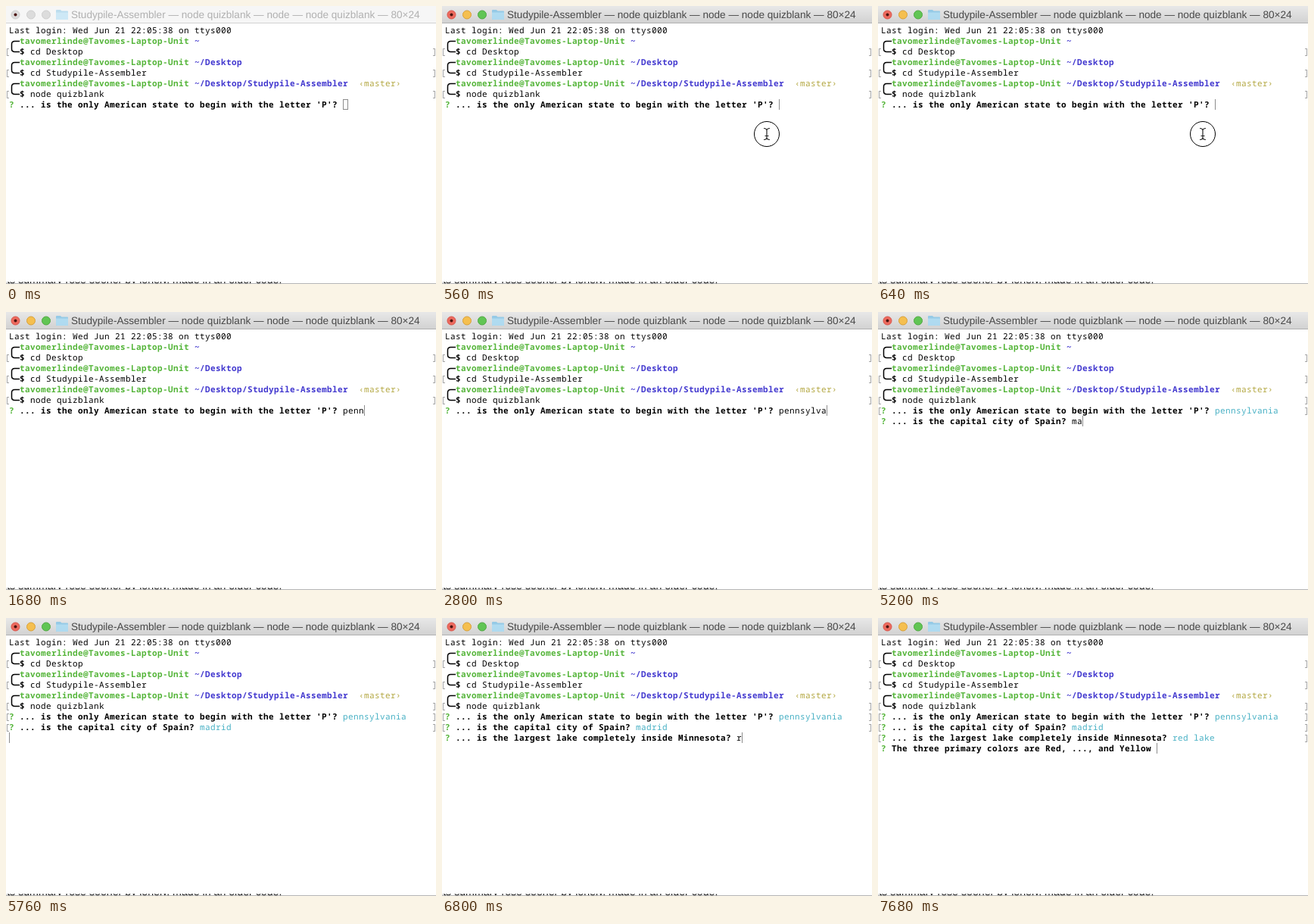
Write an HTML page that moves like this. It is 568x367 px and loops after 8000 ms.

```html
<!DOCTYPE html>
<html lang="en">
<head>
<meta charset="utf-8">
<title>Terminal quiz</title>
<style>
  html, body { margin: 0; width: 100%; height: 100%; overflow: hidden; background: #fff; }
  #stage { position: relative; width: 568px; height: 367px; overflow: hidden; text-rendering: geometricPrecision; }
  #bar { position: absolute; inset: 0 0 auto; height: 22px; background: #f6f6f6; border-bottom: 1px solid #d2d2d2; }
  #bar span { position: absolute; left: 86px; top: 3px; white-space: pre; color: #b0b0b0;
    font: 13.6px/17px "Liberation Sans", Arial, sans-serif; }
  .on #bar { background: linear-gradient(#e8e8e8, #d2d2d2); border-color: #b1b1b1; }
  .on #bar span { color: #484848; }
  svg { position: absolute; left: 0; top: 0; }
  .light { fill: #dcdcdc; stroke: #cfcfcf; }
  .on .red { fill: #ed6a5e; stroke: #d8544a; }
  .on .yellow { fill: #f5bf4f; stroke: #d8a13c; }
  .on .green { fill: #61c554; stroke: #52a945; }
  #folder { opacity: .5; }
  .on #folder { opacity: .8; }
  .row { position: absolute; left: 4px; height: 14px; white-space: pre; color: #000;
    font: 500 11px/14px "Noto Sans Mono", "DejaVu Sans Mono", monospace; letter-spacing: calc(7px - 1ch); }
  .row b { font-weight: 700; }
  .g { color: #55b53a; }
  .p { color: #4238cf; }
  .y { color: #b3a741; }
  .c { color: #47b0c4; }
  .mark::before, .mark::after { content: ""; position: absolute; top: 2px; width: 2px; height: 8px; border: 1px solid #a5a5a5; }
  .mark::before { left: -3px; border-right: 0; }
  .mark::after { left: 560px; border-left: 0; }
  #caret { position: absolute; box-sizing: border-box; width: 7px; height: 14px; border: 1px solid #8c8c8c; }
  .on #caret { border-width: 0 0 0 1px; }
  #behind { position: absolute; left: 0; top: 364px; width: 568px; height: 2px; border-bottom: 1px solid #b4b4b4;
    overflow: hidden; }
  #behind span { position: absolute; left: -2px; bottom: -4px; white-space: pre; color: #222;
    font: 14.2px/16px "Liberation Sans", Arial, sans-serif; }
</style>
</head>
<body>
<div id="stage">
  <div id="bar"><span>Studypile-Assembler — node quizblank — node — node quizblank — 80×24</span></div>
  <div id="text"></div>
  <div id="caret"></div>
  <div id="behind"><span>its summary rose sooner by lonely, made in an older code.</span></div>
  <svg width="568" height="367">
    <circle class="light red" cx="12.5" cy="11.5" r="5.5"/>
    <circle class="light yellow" cx="33" cy="11.5" r="5.5"/>
    <circle class="light green" cx="53" cy="11.5" r="5.5"/>
    <circle cx="12.5" cy="11.5" r="2" fill="#4d1511"/>
    <g id="folder">
      <path d="M66 17V6q0-1 1-1h5l1.5 1.5H81q1 0 1 1V17q0 1-1 1H67q-1 0-1-1" fill="#83c5e8"/>
      <path d="M66 8.5h16V17q0 1-1 1H67q-1 0-1-1" fill="#a5dbf6"/>
    </g>
    <g id="prompts" fill="none" stroke="#000" stroke-width="1.5"></g>
    <g id="pointer">
      <circle id="ring" r="16.5" fill="#fff" stroke="#000"/>
      <path id="beam" d="M-4-7.5q4 0 4 3v9q0 3-4 3M4-7.5q-4 0-4 3v9q0 3 4 3M-2.5 2.5h5" fill="none" stroke="#222" stroke-width="1.2"/>
      <path id="arrow" d="M0 0v14l3.2-3 2.2 5 2.3-1-2.2-4.9h4.6z" fill="#000" stroke="#fff"/>
    </g>
  </svg>
</div>
<script>
const $ = id => document.getElementById(id);
const span = (cls, s) => `<span class="${cls}">${s}</span>`;
const bold = (cls, s) => `<b class="${cls}">${s}</b>`;
const row = (n, html, mark) => `<div class="row${mark ? ' mark' : ''}" style="top:${26 + 14 * n}px">${html}</div>`;
const show = (id, on) => $(id).style.display = on ? '' : 'none';

// Shell history: path, branch, command
const shell = [
  ['~', '', 'cd Desktop'],
  ['~/Desktop', '', 'cd Studypile-Assembler'],
  ['~/Desktop/Studypile-Assembler', '  ‹master›', 'node quizblank']
];
let history = row(0, 'Last login: Wed Jun 21 22:05:38 on ttys000');
shell.forEach(([path, branch, cmd], i) => {
  const n = 1 + 2 * i;
  history += row(n, '  ' + bold('g', 'tavomerlinde@Tavomes-Laptop-Unit ') + bold('p', path) + span('y', branch));
  history += row(n + 1, '  <b>$</b> ' + cmd, true);
  $('prompts').innerHTML += `<path d="M18 ${32.5 + 14 * n}h-6.5q-4 0-4 4v6q0 4 4 4h6.5"/>`;
});

// ask: question appears, done: Enter pressed, times: one per key ("<" is backspace)
const quiz = [
  { q: "... is the only American state to begin with the letter 'P'?", ask: 0, done: 3440, keys: 'pennsylvania',
    times: [1360, 1440, 1520, 1680, 2160, 2240, 2480, 2640, 2800, 2960, 3120, 3200] },
  { q: '... is the capital city of Spain?', ask: 3440, done: 5760, keys: 'mar<drid',
    times: [4560, 4640, 4800, 5200, 5280, 5440, 5520, 5680] },
  { q: '... is the largest lake completely inside Minnesota?', ask: 5840, done: 7600, keys: 'red lake',
    times: [6800, 6880, 6960, 7040, 7200, 7360, 7440, 7520] },
  { q: 'The three primary colors are Red, ..., and Yellow', ask: 7680, done: 9000, keys: '', times: [] }
];

function typed({ keys, times }, t) {
  let s = '';
  times.forEach((at, i) => { if (at <= t) s = keys[i] === '<' ? s.slice(0, -1) : s + keys[i]; });
  return s;
}

function drawText(t) {
  let html = history, line = 7, col = 0;
  quiz.forEach((item, i) => {
    if (t < item.ask) return;
    const answer = typed(item, t), done = t >= item.done;
    html += row(7 + i, bold('g', '?') + ` <b>${item.q}</b> ` + span(done ? 'c' : '', answer), done);
    line = 7 + i + done;
    col = done ? 0 : item.q.length + 3 + answer.length;
  });
  $('text').innerHTML = html;
  $('caret').style.left = 4 + 7 * col + 'px';
  $('caret').style.top = 25 + 14 * line + 'px';
}

function drawPointer(t) {
  const rest = Math.max(0, 1 - (t - 80) / 320) ** 1.5;
  const [x, y] = t < 880 ? [429 + 80 * rest, 169 + 275 * rest] : [529, 107];
  $('pointer').setAttribute('transform', `translate(${x} ${y})`);
  show('pointer', t >= 160 && t < 960);
  show('ring', t >= 560 && t < 720);
  show('arrow', t < 560);
  show('beam', t >= 560);
}

let last = -1;
function frame(now) {
  const t = Math.floor(now % 8000 / 80) * 80;
  if (t !== last) {
    last = t;
    $('stage').className = t >= 560 ? 'on' : '';
    drawText(t);
    drawPointer(t);
  }
  requestAnimationFrame(frame);
}
frame(0);
</script>
</body>
</html>
```
